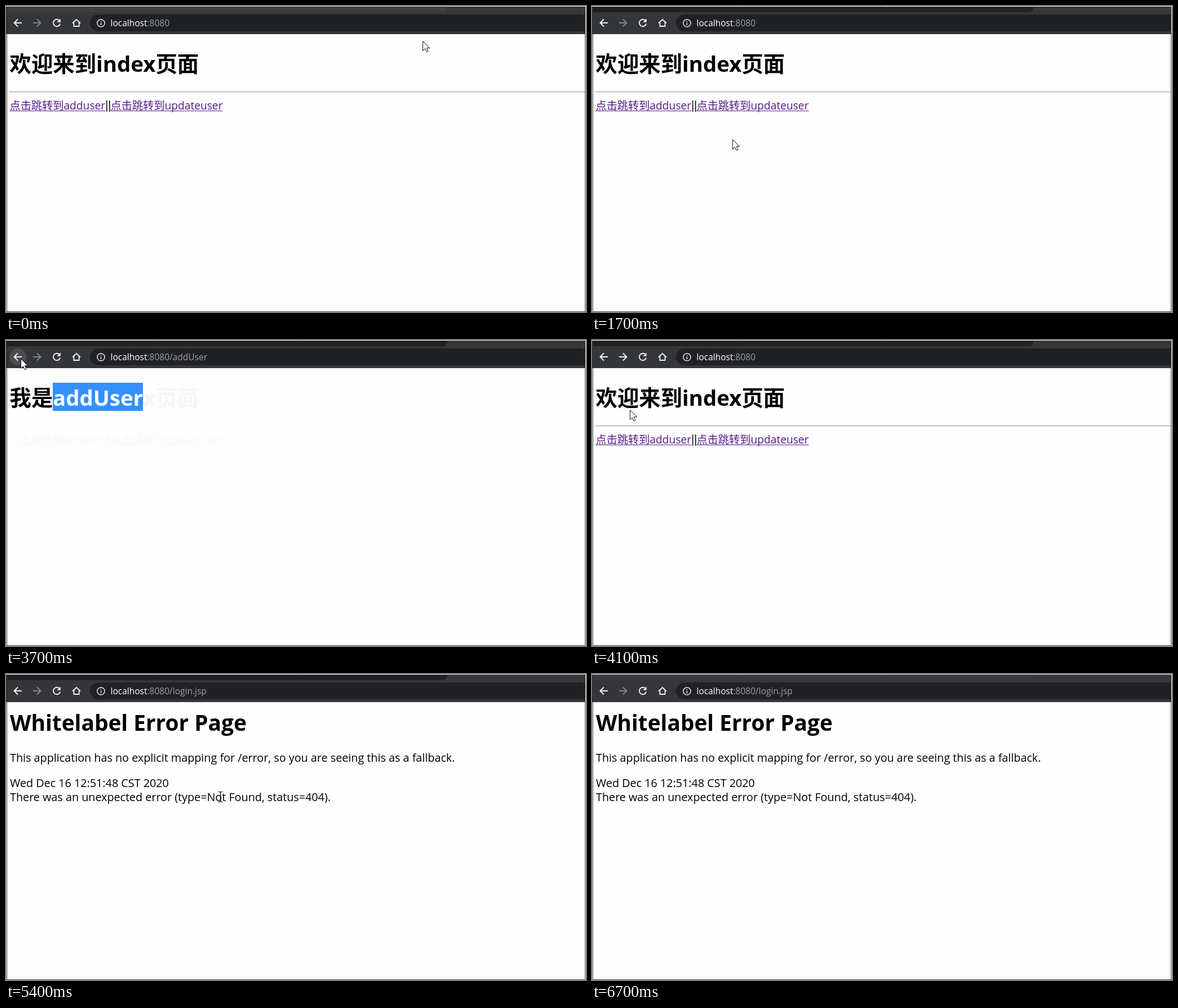
Recreate the animation shown at these times as an HTML page with a canvas. Size 1029 by 544 pixels, loop 6800 ms.

```html
<!DOCTYPE html>
<html lang="zh">
<head>
<meta charset="utf-8">
<title>localhost:8080</title>
<style>
html, body { margin: 0; width: 100%; height: 100%; overflow: hidden; background: #fff; }
canvas { display: block; }
</style>
</head>
<body>
<canvas id="stage" width="1029" height="544"></canvas>
<script>
const ctx = document.getElementById('stage').getContext('2d');
const LOOP = 6800, STEP = 100;
const FACE = '"Open Sans", "Noto Sans CJK SC", "Noto Sans CJK", sans-serif';
const TITLE = 'bold 38.4px ' + FACE;
const ERROR_TITLE = 'bold 38.8px ' + FACE;
const LINK = '19.2px ' + FACE;
const BODY = '19.75px ' + FACE;
const URL_FONT = '15.5px ' + FACE;
const ADD_OPENS = 2100, GOES_BACK = 3900, ERROR_OPENS = 4900;
const SELECT_FROM = 2700, SELECT_TO = 2900;

// Places the pointer visits; it eases from one to the next.
const stops = [
  { t: 0, x: 739, y: 62 },
  { t: 400, x: 132, y: 262 },
  { t: 900, x: 245, y: 29 },
  { t: 1400, x: 350, y: 32 },
  { t: 1600, x: 370, y: 289 },
  { t: 1800, x: 128, y: 184 },
  { t: ADD_OPENS, x: 128, y: 184 },
  { t: SELECT_FROM, x: 89, y: 97 },
  { t: SELECT_TO, x: 242, y: 97 },
  { t: 3100, x: 462, y: 172 },
  { t: 3400, x: 29, y: 4 },
  { t: 3700, x: 26, y: 33 },
  { t: GOES_BACK, x: 26, y: 33 },
  { t: 4300, x: 108, y: 214 },
  { t: 4700, x: 259, y: 178 },
  { t: 5200, x: 317, y: 218 },
  { t: 5800, x: 560, y: 218 },
  { t: 6000, x: 781, y: 293 },
  { t: 6500, x: 1030, y: 8 }
];

const ease = k => k * k * (3 - 2 * k);
const mix = (a, b, k) => a + (b - a) * k;

function pointerAt(t) {
  const i = stops.findIndex(s => s.t > t);
  if (i < 0) return null;
  const a = stops[i - 1], b = stops[i];
  const k = ease((t - a.t) / (b.t - a.t));
  return { x: mix(a.x, b.x, k), y: mix(a.y, b.y, k) };
}

function pageAt(t) {
  if (t >= ERROR_OPENS) return 'error';
  return t >= ADD_OPENS && t < GOES_BACK ? 'add' : 'index';
}

const inside = (p, x, y, w, h) => p && p.x >= x && p.x <= x + w && p.y >= y && p.y <= y + h;

function rect(color, x, y, w, h) {
  ctx.fillStyle = color;
  ctx.fillRect(x, y, w, h);
}

function roundRect(color, x, y, w, h, radii) {
  ctx.beginPath();
  ctx.roundRect(x, y, w, h, radii);
  ctx.fillStyle = color;
  ctx.fill();
}

// Returns the x where the text ends.
function text(str, x, y, font, color = '#000') {
  ctx.font = font;
  ctx.fillStyle = color;
  ctx.fillText(str, x, y);
  return x + ctx.measureText(str).width;
}

function shape(d, x, y, stroke, width, fill) {
  const p = new Path2D(d);
  ctx.save();
  ctx.translate(x, y);
  if (fill) { ctx.fillStyle = fill; ctx.fill(p); }
  ctx.strokeStyle = stroke;
  ctx.lineWidth = width;
  ctx.stroke(p);
  ctx.restore();
}

function drawArrow(x, dir, color) {
  shape(`M${-7 * dir} 0H${6 * dir}M0 -6.5L${6.5 * dir} 0L0 6.5`, x, 30, color, 1.9);
}

function drawToolbar(t, page, pointer) {
  const light = '#f1f3f4';
  rect('#35363a', 0, 1, 1028, 49);
  const tab = t < 100 ? '#394142' : t >= 6700 ? '#3a3b3f' : '#202124';
  roundRect(tab, 1, 1, 782, 10, [0, 0, 8, 0]);
  for (const x of [265, 523]) rect('#65676b', x, 1, 1, 2);

  if (inside(pointer, 6, 15, 30, 30)) roundRect('#4c4d51', 6, 15, 30, 30, 15);
  drawArrow(21, -1, light);
  drawArrow(55, 1, page === 'index' && t >= GOES_BACK ? light : '#85868a');
  shape('M5 -3.8A6.2 6.2 0 1 0 6.1 1.5', 90, 30, light, 1.9);
  shape('M6.5 -7V-1.5H1Z', 90, 30, light, 0.5, light);
  shape('M-7 0.5L0 -6L7 0.5M-4.6 -1V6H4.6V-1', 125, 30, light, 1.8);

  const hover = inside(pointer, 149, 15, 878, 30);
  roundRect(hover ? '#292a2d' : '#202124', 149, 15, 879, 30, [15, 0, 0, 15]);
  shape('M6.6 0A6.6 6.6 0 1 1 -6.6 0A6.6 6.6 0 1 1 6.6 0M0 -0.8V3.7M0 -3.6V-2', 168.5, 30.5, '#e8eaed', 1.5);
  const route = { index: '', add: '/addUser', error: '/login.jsp' }[page];
  const end = text('localhost', 185.5, 36, URL_FONT, '#fff');
  text(':8080' + route, end, 36, URL_FONT, '#9aa0a6');
}

function drawLink(str, x) {
  const end = text(str, x, 184, LINK, '#551a8b');
  rect('#551a8b', x, 186, end - x, 1);
}

function drawIndex() {
  text('欢迎来到index页面', 6.5, 117, TITLE);
  rect('#a2a2a2', 6, 152, 1021, 1);
  rect('#e6e6e6', 6, 153, 1021, 1);
  drawLink('点击跳转到adduser', 6.5);
  for (const x of [178, 183]) rect('#000', x, 168, 1.5, 20);
  drawLink('点击跳转到updateuser', 185.5);
}

function drawAddTitle(color) {
  text('我是', 6.5, 117, TITLE, color);
  text('addUser', 83, 117, TITLE, color);
}

function drawAdd(t, pointer) {
  // Faint afterimage of the page just left
  ctx.globalAlpha = 0.03;
  drawIndex();
  ctx.globalAlpha = 1;
  rect('#fefefe', 5, 76, 238, 50);
  drawAddTitle('#000');
  if (t <= SELECT_FROM) return;

  const width = (t < SELECT_TO ? pointer.x : 243) - 83;
  ctx.save();
  ctx.beginPath();
  ctx.rect(83, 76, width, 50);
  ctx.clip();
  rect('#3390ff', 83, 76, width, 50);
  drawAddTitle('#fff');
  ctx.restore();
}

function drawError() {
  text('Whitelabel Error Page', 7, 101, ERROR_TITLE);
  text('This application has no explicit mapping for /error, so you are seeing this as a fallback.', 7, 156, BODY);
  text('Wed Dec 16 12:51:48 CST 2020', 7, 201, BODY);
  text('There was an unexpected error (type=Not Found, status=404).', 7, 226, BODY);
}

function pointerKind(page, p) {
  if (inside(p, 149, 15, 878, 30)) return 'beam';
  if (page === 'index' && inside(p, 7, 166, 377, 23)) return 'hand';
  if (page === 'add' && inside(p, 7, 76, 236, 50)) return 'beam';
  if (page === 'error' && inside(p, 7, 208, 570, 23)) return 'beam';
  return 'arrow';
}

function drawPointer(page, p) {
  const x = Math.round(p.x) + 0.5, y = Math.round(p.y) + 0.5;
  const kind = pointerKind(page, p);
  if (kind === 'beam') {
    shape('M-4 -9H-1L0 -8L1 -9H4M0 -8V8M-4 9H-1L0 8L1 9H4', x, y, p.y < 50 ? '#fff' : '#000', 1.2);
  } else if (kind === 'hand') {
    shape('M-2 12V1Q-2 -1 0 -1Q2 -1 2 1V7Q5 5.5 5.5 8Q8 7 8.5 9Q11 8.5 11 11V15Q11 18 8 21H0Q-2 17 -6 13Q-7 10 -4 10Z',
      x - 1, y, '#222', 1, '#fff');
  } else {
    shape('M0 0V17L4 13.2L6.6 19.3L9.5 18L7 12.2H12.2Z', x, y, '#111', 1, '#fff');
  }
}

function draw(t) {
  const page = pageAt(t), pointer = pointerAt(t);
  rect('#fff', 0, 0, 1029, 544);
  rect('#fefefe', 2, 50, 1025, 493);
  if (page === 'index') drawIndex();
  else if (page === 'add') drawAdd(t, pointer);
  else drawError();
  drawToolbar(t, page, pointer);
  ctx.strokeStyle = '#303134';
  ctx.lineWidth = 1;
  ctx.strokeRect(1.5, 1.5, 1026, 542);
  if (pointer) drawPointer(page, pointer);
}

const start = performance.now();
function tick() {
  const t = (performance.now() - start) % LOOP;
  draw(Math.floor(t / STEP) * STEP);
  requestAnimationFrame(tick);
}
tick();
</script>
</body>
</html>
```
